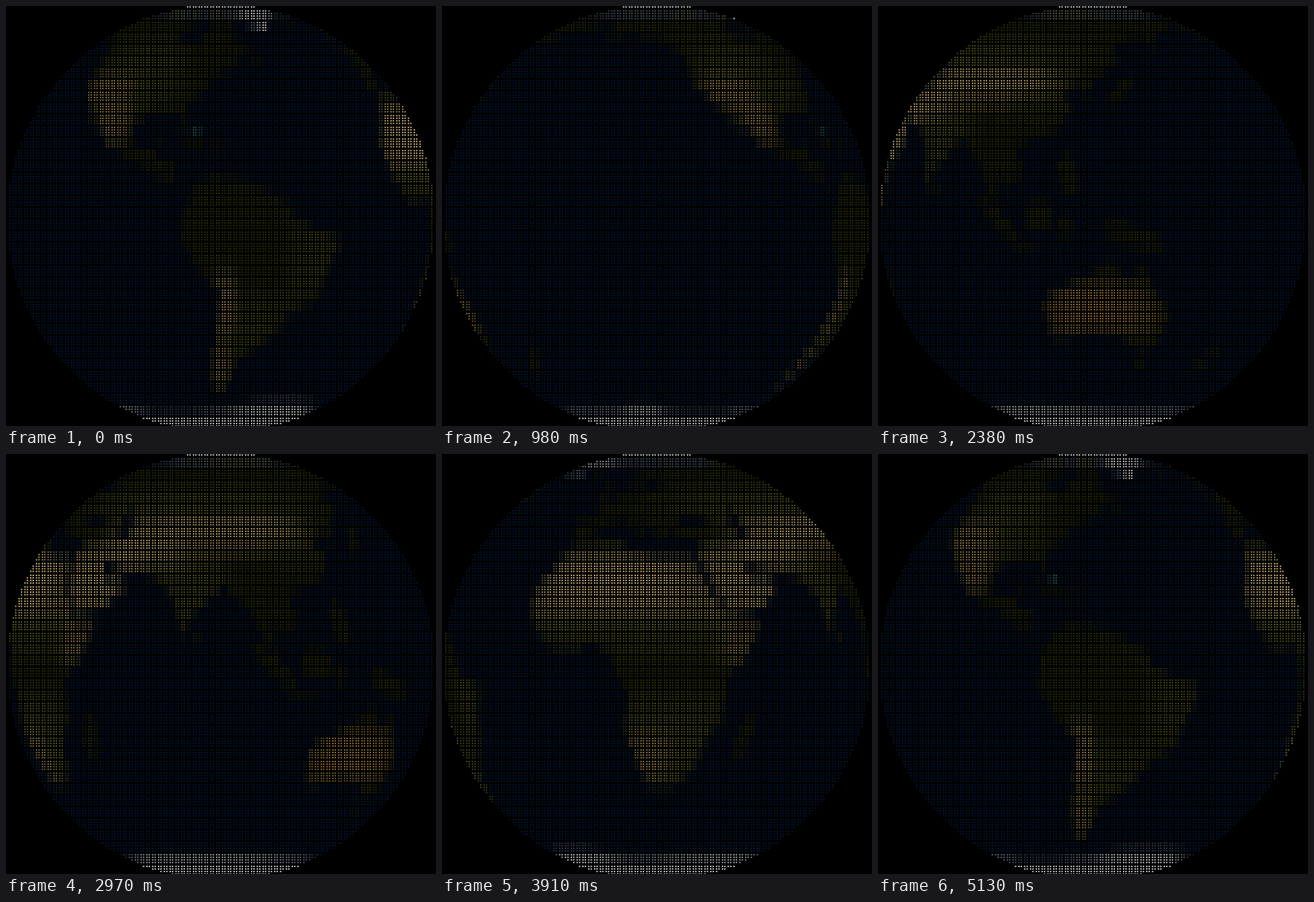
An HTML page with a canvas for the animation above (5250 ms loop, 481x469 px).

```html
<!DOCTYPE html>
<html lang="en">
<head>
<meta charset="utf-8">
<title>Dot globe</title>
<style>
  html, body { margin: 0; width: 100%; height: 100%; overflow: hidden; background: #000; }
  canvas { display: block; }
</style>
</head>
<body>
<canvas id="stage" width="481" height="469"></canvas>
<script>
const ctx = document.getElementById('stage').getContext('2d');

// Coastlines as flat lon, lat pairs
const northAmerica = [-168,66, -156,71, -128,70, -110,68, -95,70, -83,68, -94,60, -92,57, -82,55, -79,52,
  -78,61, -72,62, -65,59, -56,52, -66,49, -61,46, -70,43, -75,38, -81,31, -80,25, -83,30, -90,30, -97,27,
  -97,20, -91,18.5, -87,21, -88,16, -83,15, -83,10, -78,9, -85,10, -95,16, -105,20, -112,30, -110,23,
  -117,33, -124,40, -124,48, -133,56, -150,60, -164,55, -160,60];
const southAmerica = [-78,8, -72,12, -62,10, -51,4, -50,0, -44,-2.5, -35,-6, -39,-14, -41,-22, -48,-26,
  -54,-34, -58,-38, -62,-39, -65,-43, -66,-48, -69,-53, -68,-55, -74,-52, -73,-40, -70,-20, -76,-14, -81,-5, -80,1];
const africa = [-6,36, 10,37, 11,33, 20,31, 32,31, 37,20, 43,12, 51,12, 46,3, 40,-4, 40,-15, 35,-20, 33,-27,
  27,-34, 19,-34.5, 15,-27, 12,-17, 13,-7, 9,0, 9,4, 4,6, -8,4.5, -16,12, -17,20, -10,30];
const europe = [-9,43, -9,37, -2,37, 3,43, 9,44, 16,38, 18,40, 13,45, 20,40, 23,37, 27,40, 28,37, 36,37,
  50,37, 60,45, 60,69, 42,67, 40,65, 38,68, 25,71, 12,65, 5,61, 8,58, 12,56, 17,60, 23,65, 22,60, 28,60,
  20,55, 8,54, -4,48, -1,44];
const asia = [36,37, 34,31, 39,20, 43,13, 52,16, 59,22, 56,25, 51,24, 48,30, 57,27, 66,25, 73,20, 77,8, 80,15,
  88,22, 94,17, 98,10, 103,1.5, 101,13, 105,9, 109,12, 106,20, 117,23, 122,30, 119,37, 125,39, 126,35, 129,36,
  128,40, 140,48, 137,54, 155,59, 157,51, 163,60, 179,63, 190,66, 180,69, 160,70, 130,72, 105,77, 80,72, 58,69];
const australia = [114,-22, 122,-18, 129,-15, 132,-11.5, 136,-12, 136,-15, 140,-17.5, 142,-11, 146,-19,
  153,-26, 150,-37, 144,-38.5, 138,-34, 131,-31.5, 124,-33, 115,-34.5];
const greenland = [-70,77, -55,82, -25,82, -20,72, -40,65, -44,60, -52,66, -57,76];
const mainland = [northAmerica, southAmerica, africa, europe, asia, australia];

// Ellipses: lon, lat, radius x, radius y, turn in degrees
const islands = [[47,-19,2.2,6.5,-15], [114,1,4.5,4.5,0], [102,0,8,2,-45], [110,-7.3,5,1,0], [140,-5,9,2.8,-18],
  [121,-2,2,3.5,0], [122,12,2.5,6,10], [138,37,2,7,-40], [-3,54,2.5,4,0], [-19,65,4,1.5,0], [-79,22,4.5,1,-15],
  [-71,19,3,1,0], [172,-43,1.8,5,-40], [176,-39,1.5,3,0], [-72,69,11,5,-30], [-110,72,10,4,0], [81,7.5,1,2,0],
  [-56,49,3,2,0], [146,-42,2,1.6,0]];
const seas = [[51,42,2.3,5,15], [34,43,6,2,0]];

const inPolygon = (points, x, y) => {
  let inside = false;
  for (let i = 0, j = points.length - 2; i < points.length; j = i, i += 2) {
    const [x1, y1, x2, y2] = [points[i], points[i + 1], points[j], points[j + 1]];
    if (y1 > y !== y2 > y && x < (x2 - x1) * (y - y1) / (y2 - y1) + x1) inside = !inside;
  }
  return inside;
};
const inEllipse = ([cx, cy, rx, ry, turn], x, y) => {
  const a = turn * Math.PI / 180, dx = x - cx, dy = y - cy;
  const u = dx * Math.cos(a) + dy * Math.sin(a), v = dy * Math.cos(a) - dx * Math.sin(a);
  return (u / rx) ** 2 + (v / ry) ** 2 < 1;
};
const clamp = v => Math.max(0, Math.min(1, v));
const mix = (a, b, k) => a.map((v, i) => v + (b[i] - v) * k);
const bump = (x, y, cx, cy, rx, ry) => Math.exp(-(((x - cx) / rx) ** 4) - ((y - cy) / ry) ** 4);

const OCEAN = [5, 29, 65], FOREST = [50, 61, 10], STEPPE = [108, 110, 38], ICE = [240, 243, 244];
const SAND = [250, 215, 145], ROCK = [200, 160, 98], RED_SOIL = [194, 143, 74];
// Dry regions: colour, lon, lat, radius x, radius y, strength
const dryLands = [
  [STEPPE, 10, 10, 60, 8, .7], [STEPPE, 25, -22, 16, 15, .9], [STEPPE, -42, -10, 9, 14, .6],
  [STEPPE, -60, -32, 12, 12, .6], [STEPPE, 78, 22, 12, 14, .8], [STEPPE, 75, 50, 50, 7, .8],
  [STEPPE, -103, 42, 20, 15, .7], [STEPPE, 112, 35, 14, 8, .5],
  [SAND, 9, 23, 30, 10, 1], [SAND, 48, 24, 14, 11, .9], [SAND, 62, 36, 16, 9, .8],
  [SAND, 92, 40, 25, 5, .85], [ROCK, 90, 34, 14, 4, .6], [ROCK, 45, 7, 7, 7, .7],
  [ROCK, -111, 37, 10, 6, .8], [ROCK, -105, 27, 7, 7, .8], [ROCK, 19, -25, 6, 8, .7],
  [ROCK, -69, -24, 3.5, 10, .9], [ROCK, -70, -45, 4, 9, .7],
  [RED_SOIL, 129, -25, 16, 8, .95], [RED_SOIL, 144, -27, 6, 5, .6]
];

function surfaceColour(lon, lat) {
  const east = lon < -168 ? lon + 360 : lon;
  let colour = OCEAN;
  if (bump(lon, lat, -77.5, 24, 2, 1.8) > .4) colour = [45, 120, 130];
  const land = mainland.some(p => inPolygon(p, east, lat)) || islands.some(e => inEllipse(e, lon, lat));
  if (land && !seas.some(e => inEllipse(e, lon, lat))) {
    colour = FOREST;
    for (const [tint, x, y, rx, ry, strength] of dryLands)
      colour = mix(colour, tint, strength * bump(lon, lat, x, y, rx, ry));
  }
  if (inPolygon(greenland, lon, lat)) colour = ICE;
  const shelf = -61.5 + 5 * bump(lon, 0, -33, 0, 28, 1) + 3 * bump(lon, 0, -145, 0, 12, 1)
    + 2.5 * bump(lon, 0, 75, 0, 50, 1) - 2 * bump(lon, 0, -105, 0, 25, 1);
  colour = mix(colour, ICE, clamp((shelf - lat) / 6));
  return mix(colour, ICE, clamp((lat - 70) / 10));
}

const texture = Array.from({ length: 180 }, (_, row) =>
  Array.from({ length: 360 }, (_, col) => surfaceColour(col - 179.5, 89.5 - row)));

// Braille cells of 2 x 4 dots, with the disc measured in dots
const COLS = 74, ROWS = 37, RADIUS = 73.45, CENTER_X = 73.5, CENTER_Y = 75.5;
const cells = [];
for (let row = 0; row < ROWS; row++) for (let col = 0; col < COLS; col++) {
  const dots = [];
  for (let k = 0; k < 8; k++) {
    const i = k % 2, j = k >> 1;
    const x = (col * 2 + i - CENTER_X) / RADIUS, y = (CENTER_Y - row * 4 - j) / RADIUS;
    if (x * x + y * y > 1) continue;
    dots.push({
      left: col * 6.5 + 1 + i * 2.7, top: row * 13 - 8.2 + j * 2.85,
      lon: Math.atan2(x, Math.sqrt(1 - x * x - y * y)) * 180 / Math.PI,
      texRow: Math.min(179, Math.floor(90 - Math.asin(y) * 180 / Math.PI))
    });
  }
  if (dots.length) cells.push(dots);
}

function drawGlobe(centerLon) {
  ctx.fillStyle = '#000';
  ctx.fillRect(0, 0, 481, 469);
  for (const dots of cells) {
    const sum = [0, 0, 0];
    for (const { lon, texRow } of dots) {
      const col = Math.floor(((lon + centerLon + 180) % 360 + 360) % 360);
      texture[texRow][col].forEach((v, i) => sum[i] += v);
    }
    ctx.fillStyle = `rgb(${sum.map(v => Math.round(v / dots.length))})`;
    for (const { left, top } of dots) ctx.fillRect(left, top, 1.4, 1.4);
  }
}

// Runs of evenly spaced turns: first time, last time, count
const LOOP = 5250;
const runs = [[120, 640, 10], [700, 1210, 10], [1270, 1740, 9], [1860, 2380, 10], [2440, 2910, 9],
  [2970, 3440, 9], [3500, 3970, 9], [4030, 4550, 10], [4600, 5070, 9], [5130, 5130, 1]];
const turnTimes = runs.flatMap(([first, last, count]) => Array.from({ length: count }, (_, k) =>
  Math.round((first + (last - first) * k / Math.max(1, count - 1)) / 10) * 10));
const TURN = 360 / (turnTimes.length + 1);

let shown = -1;
function frame() {
  const t = performance.now() % LOOP;
  const step = turnTimes.filter(time => time <= t).length;
  if (step !== shown) drawGlobe(-70 - step * TURN);
  shown = step;
  requestAnimationFrame(frame);
}
frame();
</script>
</body>
</html>
```
